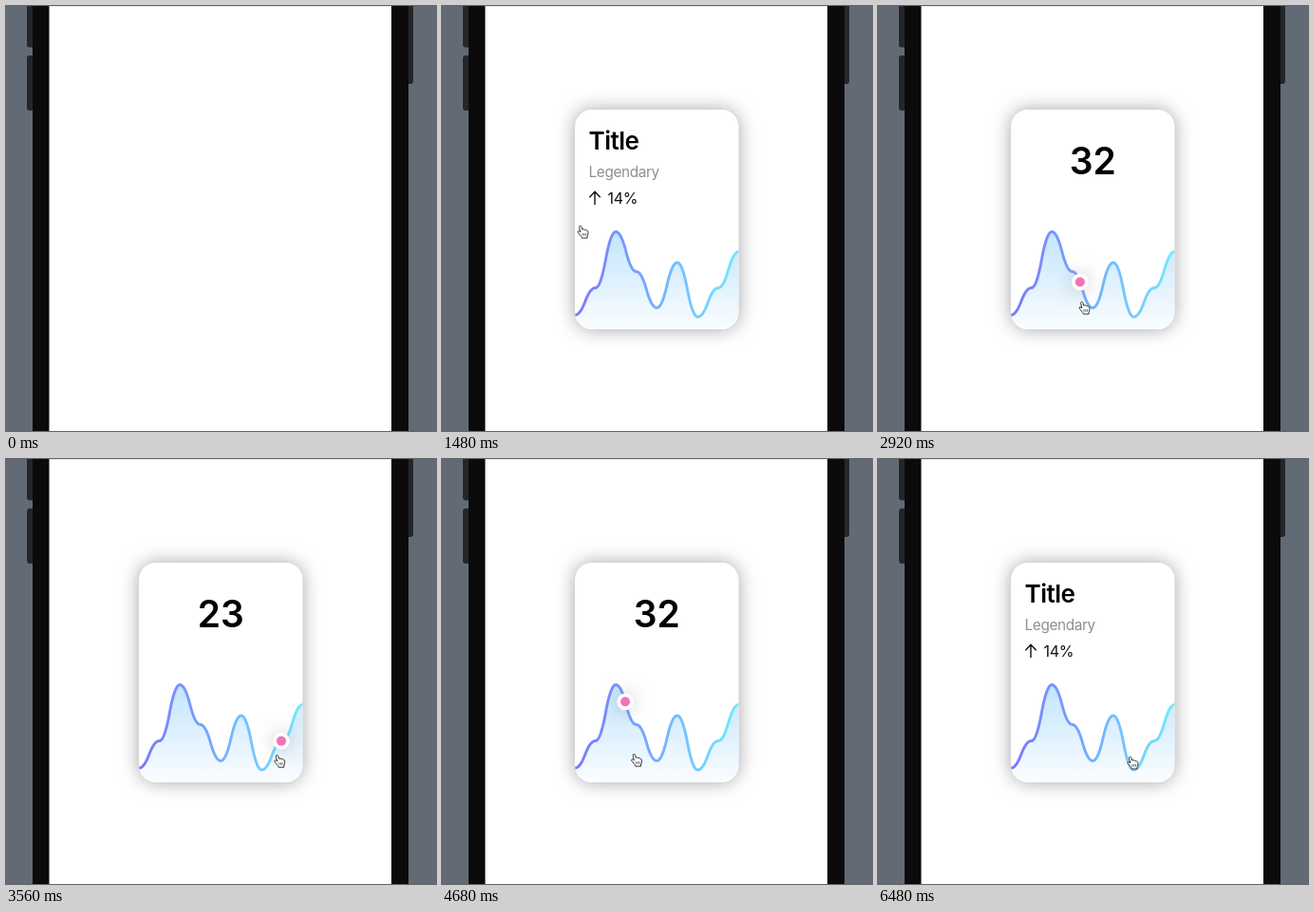
An HTML page with a canvas for the animation above (6.52 s loop, 453 px wide and 447 px high).

```html
<!DOCTYPE html>
<html lang="en">
<head>
<meta charset="utf-8">
<style>
html, body { margin: 0; width: 100%; height: 100%; overflow: hidden; background: #626a75; }
canvas { display: block; }
</style>
</head>
<body>
<canvas id="stage" width="453" height="447"></canvas>
<script>
const ctx = document.getElementById('stage').getContext('2d');
const LOOP = 6520, APPEAR = 80, PRESS = 2118, RELEASE = 6130;
const DOT_LAG = 30, SLIDE = 160;
const card = { x: 140, y: 109, w: 172.5, h: 231, r: 18 };
const values = [8, 23, 54, 32, 12, 37, 7, 23, 43];
const step = card.w / (values.length - 1);
const font = 'Inter, "Liberation Sans", sans-serif';

// Pointer keyframes: time, x, y
const track = [
  [900, -12, 165], [1400, 146, 235], [1480, 148, 238], [1700, 153, 252],
  [2080, 189, 309], [2280, 177, 310], [2480, 165, 312], [2800, 208, 317],
  [2920, 217, 318], [3040, 219, 318], [3420, 302, 319], [3760, 248, 316],
  [4080, 187, 313], [4480, 165, 314], [4800, 235, 319], [5040, 268, 320],
  [5240, 285, 320], [5480, 291, 320], [5800, 188, 317], [6060, 268, 320],
  [6520, 268, 320]
];

const clamp = v => Math.max(0, Math.min(1, v));
const smooth = v => { v = clamp(v); return v * v * (3 - 2 * v); };

// Tangent at a keyframe, flat where the motion turns round
function slope(i, k) {
  const a = track[i - 1], b = track[i], c = track[i + 1];
  if (!a || !c || (b[k] - a[k]) * (c[k] - b[k]) <= 0) return 0;
  return (c[k] - a[k]) / (c[0] - a[0]);
}

function pointer(t) {
  let i = 0;
  while (i < track.length - 2 && t > track[i + 1][0]) i++;
  const a = track[i], b = track[i + 1], d = b[0] - a[0];
  const p = clamp((t - a[0]) / d), q = 1 - p;
  return [1, 2].map(k =>
    a[k] * q * q * (1 + 2 * p) + b[k] * p * p * (1 + 2 * q) +
    d * p * q * (slope(i, k) * q - slope(i + 1, k) * p));
}

const levelY = v => 340.3 - v * 1.904;

function curveY(x) {
  const u = (x - card.x) / step;
  const i = Math.max(0, Math.min(values.length - 2, Math.floor(u)));
  const f = clamp(u - i);
  const e = f < .5 ? 2 * f * f : 1 - 2 * (1 - f) * (1 - f);
  return levelY(values[i] + (values[i + 1] - values[i]) * e);
}

// The value follows the fingertip at once, the dot a moment later
const touchX = t => Math.max(card.x, Math.min(card.x + card.w, pointer(t)[0] - 2.7));
const valueAt = t => values[Math.round((touchX(t) - card.x) / step)];

// Curve, its filled area and its length
const line = new Path2D();
let length = 0;
for (let x = 0; x <= card.w; x += .5) {
  const y = curveY(card.x + x);
  line.lineTo(card.x + x, y);
  if (x) length += Math.hypot(.5, y - curveY(card.x + x - .5));
}
const area = new Path2D(line);
area.lineTo(card.x + card.w, 340);
area.lineTo(card.x, 340);

function gradient(x0, y0, x1, y1, from, to) {
  const g = ctx.createLinearGradient(x0, y0, x1, y1);
  g.addColorStop(0, from);
  g.addColorStop(1, to);
  return g;
}
const lineColor = gradient(140, 0, 312, 0, '#7b75ff', '#6feaff');
const areaColor = gradient(0, 237, 0, 340, '#c2e5fd', '#fbfdff');

const cardShape = new Path2D();
cardShape.roundRect(card.x, card.y, card.w, card.h, card.r);
const hand = new Path2D('M-3.4-5.4q0-1.4 1-1.4q1.2 0 1.5 1.4l.6 2.4q2-.8 2.5 .4q1.8-.5 2.1 .7q1.5 0 1.6 1.5q.2 2.6-.8 4.2l-.1 2.2h-5.6q-.4-1.6-1.8-2.8l-2.4-3q-.6-1.4 .7-1.6q.8 0 1.9 1.2z');
const knuckles = new Path2D('M-.1 1v2.6M1.7 1v2.6M3.4 1v2.6');

function box(color, x, y, w, h, r = 0) {
  ctx.fillStyle = color;
  ctx.beginPath();
  ctx.roundRect(x, y, w, h, r);
  ctx.fill();
}

function text(str, x, y, size, weight, color, spacing = 0) {
  ctx.font = `${weight} ${size}px ${font}`;
  ctx.letterSpacing = spacing + 'px';
  ctx.fillStyle = color;
  ctx.fillText(str, x, y);
}

function drawPhone() {
  box('#626a75', 0, 0, 453, 447);
  box('#24262a', 22, -10, 8, 53.5, 3);
  box('#24262a', 22, 52, 8, 58, 3);
  box('#24262a', 421, -10, 8, 92, 3);
  box('#0b0b0b', 28, 0, 396, 447);
  box('#fff', 45.5, 0, 360.5, 447);
  box('#e9e9e9', 46, 0, 360, 1);
}

function drawHeading(alpha) {
  ctx.save();
  ctx.globalAlpha *= alpha;
  text('Title', 154.5, 151, 26, 600, '#000', -.5);
  text('Legendary', 154.5, 180, 15.4, 400, '#8e8e93', -.4);
  text('14%', 174.5, 208, 16, 400, '#111', -.3);
  ctx.strokeStyle = '#111';
  ctx.lineWidth = 1.4;
  ctx.stroke(new Path2D('M161 209V195.5M155.3 201.2L161 195.3L166.7 201.2'));
  ctx.restore();
}

// After the digit count changes, the number slides back to the centre
function numberShift(t) {
  const digits = s => String(valueAt(s)).length;
  for (let d = 5; d < SLIDE && t - d > PRESS; d += 5) {
    const change = digits(t) - digits(t - d);
    if (change) return change * 12 * (1 - smooth(d / SLIDE));
  }
  return 0;
}

function drawNumber(t, scale) {
  if (scale <= 0) return;
  ctx.save();
  ctx.translate(226.3 + numberShift(t) * scale, 133 + 30 * scale);
  ctx.scale(scale, scale);
  ctx.textAlign = 'center';
  text(valueAt(Math.min(t, RELEASE)), 0, 14, 39, 600, '#000');
  ctx.restore();
}

function drawDot(x) {
  const y = curveY(x);
  ctx.save();
  ctx.beginPath();
  ctx.rect(card.x, 225, card.w, 115);
  ctx.clip();
  ctx.shadowColor = 'rgba(142,142,147,.5)';
  ctx.shadowBlur = 18;
  box('#fff', x - 8.7, y - 8.7, 17.4, 17.4, 8.7);
  ctx.restore();
  box('#fff', x - 8.7, y - 8.7, 17.4, 17.4, 8.7);
  box('#f472b8', x - 5, y - 5, 10, 10, 5);
}

function drawCard(t) {
  ctx.save();
  ctx.globalAlpha = clamp((t - APPEAR + 40) / 120);
  ctx.save();
  ctx.shadowColor = 'rgba(142,142,147,.8)';
  ctx.shadowBlur = 19;
  ctx.fillStyle = '#fff';
  ctx.fill(cardShape);
  ctx.restore();

  ctx.save();
  ctx.clip(cardShape);
  const age = t - APPEAR;
  ctx.save();
  ctx.globalAlpha *= clamp(age / 1350) ** 2;
  ctx.fillStyle = areaColor;
  ctx.fill(area);
  ctx.restore();
  ctx.strokeStyle = lineColor;
  ctx.lineWidth = 2.9;
  ctx.lineJoin = 'round';
  const drawn = 1 - (1 - clamp(age / 1200)) ** 1.8;
  ctx.setLineDash(drawn < 1 ? [length * drawn, 2 * length] : []);
  ctx.stroke(line);
  ctx.setLineDash([]);
  ctx.restore();

  const heading = t < RELEASE ? 1 - clamp((t - PRESS) / 100) : clamp((t - RELEASE - 60) / 100);
  drawHeading(heading);
  drawNumber(t, smooth((t - PRESS) / 350) * (1 - smooth((t - RELEASE) / 300)));
  if (t >= PRESS && t < RELEASE) drawDot(touchX(t - DOT_LAG));
  ctx.restore();
}

function drawPointer(t) {
  ctx.save();
  ctx.translate(...pointer(t));
  ctx.fillStyle = '#fff';
  ctx.strokeStyle = '#333';
  ctx.lineWidth = 1;
  ctx.lineJoin = 'round';
  ctx.fill(hand);
  ctx.stroke(hand);
  ctx.lineWidth = .7;
  ctx.stroke(knuckles);
  ctx.restore();
}

const start = performance.now();
function frame() {
  const t = (performance.now() - start) % LOOP;
  drawPhone();
  if (t >= APPEAR) drawCard(t);
  if (t >= track[0][0]) drawPointer(t);
  requestAnimationFrame(frame);
}
frame();
</script>
</body>
</html>
```
